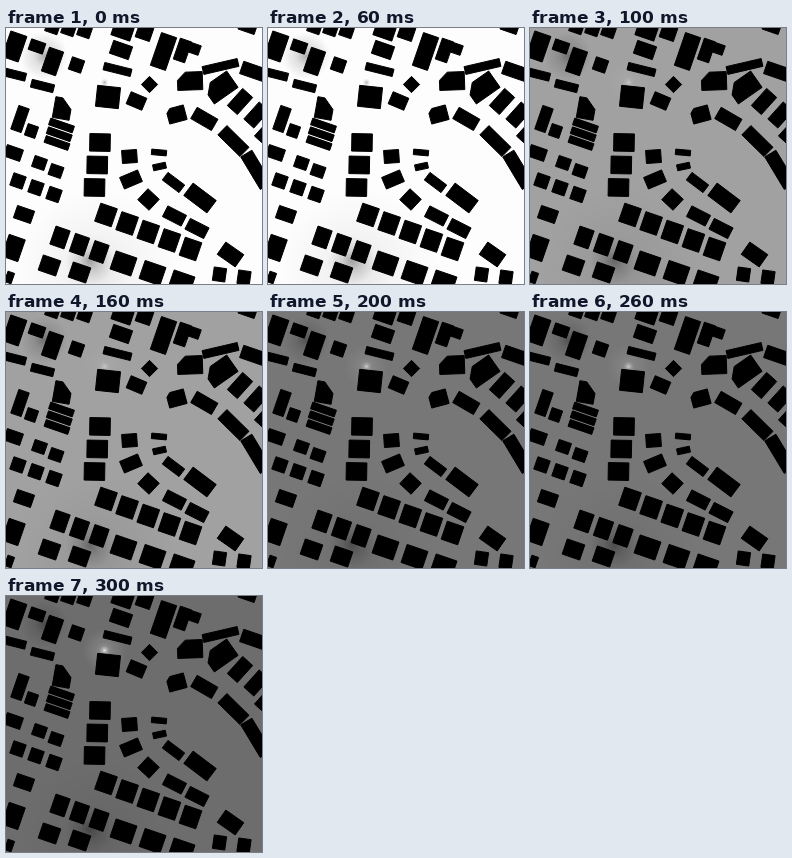
An HTML page with a canvas that plays this animation: 256x256 px, repeating every 0.4 s.

```html
<!DOCTYPE html>
<html lang="en">
<head>
<meta charset="utf-8">
<title>Fading light over a street plan</title>
<style>
  html, body { margin: 0; width: 100%; height: 100%; overflow: hidden; }
  canvas { display: block; width: 256px; height: 256px; }
</style>
</head>
<body>
<canvas id="map" width="256" height="256"></canvas>
<script>
const ctx = document.getElementById('map').getContext('2d');
const STEP = 100, STEPS = 4;
const LAMP = { x: 98.5, y: 54.5 };
const SLOPE = 19; // main street direction in degrees
const plan = new Path2D();

// A rectangle around (x, y); cut chops off its first corner
function house(x, y, w, h, degrees = SLOPE, cut = 0) {
  const l = -w / 2, t = -h / 2;
  const shape = new Path2D(`M${l + cut} ${t}H${-l}V${-t}H${l}V${t + cut}Z`);
  plan.addPath(shape, new DOMMatrix().translate(x, y).rotate(degrees));
}

// Equal houses evenly spaced between two centres
function row(count, x0, y0, x1, y1, w, h, degrees) {
  for (let i = 0; i < count; i++) {
    const p = i / (count - 1);
    house(x0 + (x1 - x0) * p, y0 + (y1 - y0) * p, w, h, degrees);
  }
}

// Houses following a bend, each longer than the last
function crescent(count, cx, cy, radius) {
  for (let i = 0; i < count; i++) {
    const degrees = 30 + 14.5 * i, a = degrees * Math.PI / 180;
    house(cx + radius * Math.sin(a), cy - radius * Math.cos(a), 24 + 7 * i, 13, degrees);
  }
}

function buildNorth() {
  row(3, 46, -1, 78, 3, 13, 11);
  row(2, 8, 46, 36, 57.5, 23, 8, 14);
  house(8, 18, 17, 27);
  house(30.5, 18, 15, 11);
  house(46, 33, 15, 25);
  house(70, 36.5, 13, 13);
  row(2, 116, 3, 114.5, 21.5, 20, 13.5);
  house(111, 41, 28, 7.5, 14);
  house(138, 4, 15, 14);
  house(157, 23, 16, 34.5);
  house(176, 22, 12, 22);
  house(187, 20, 13, 10);
  house(143, 56, 11.5, 11.5, 45);
  house(130, 72.5, 17, 13, 23);
  house(101.5, 68.5, 23, 21, 6);
}

function buildEast() {
  house(241, -1, 17, 9);
  house(214, 38, 36, 8, -13);
  house(247, 43, 25, 13);
  house(183.5, 52.5, 25, 18, -2, 8);
  house(214, 59, 29, 20, -35, 9);
  house(170, 86, 18, 15, -15, 4);
  row(2, 233.5, 73, 250, 86.5, 13.5, 23, 42);
  house(256, 106, 10, 13, 42);
  crescent(3, 125.3, 216, 145);
}

function buildWest() {
  house(56, 80, 21, 17, 100, 10);
  house(13.5, 90.5, 11, 25);
  house(25, 102.5, 11, 12);
  row(3, 55, 97, 50.5, 114.5, 25, 7);
  house(7, 124.5, 17, 12);
  row(2, 33, 134.5, 49.5, 142.5, 13, 11.5);
  row(3, 11.5, 152.5, 47.5, 166, 13, 13);
  house(17.5, 186, 18, 13);
}

function buildCentre() {
  row(3, 93.5, 114, 88, 159, 20.5, 17.5, 1);
  house(123, 128, 15, 13, -4);
  house(124.5, 151, 19.5, 12.5, -23);
  house(152.5, 124, 15, 5.5, 5);
  house(153, 138, 13, 6, -12);
  house(167, 154, 21, 9.5, 37);
  house(193.5, 169.5, 29, 15.5, 37);
  house(142, 171, 15.5, 15, 43);
}

function buildSouth() {
  row(2, 168, 187.5, 190.5, 200, 21, 12, 27);
  row(5, 99.5, 186.5, 184, 220.5, 17.5, 19);
  row(3, 53.5, 209, 92.5, 223.5, 15, 19);
  row(2, 43, 237, 73, 244, 18.5, 16);
  row(3, 117, 235, 175, 254, 22, 19);
  house(7, 219.5, 17, 23);
  house(3, 249, 7, 11);
  house(224, 226, 22, 15, 35);
  row(2, 213, 246, 237.5, 249, 12.5, 13.5, 8);
}

function softSpot(x, y, radius, tone, alpha) {
  const g = ctx.createRadialGradient(x, y, 0, x, y, radius);
  g.addColorStop(0, `rgba(${tone},${tone},${tone},${alpha})`);
  g.addColorStop(0.4, `rgba(${tone},${tone},${tone},${alpha * 0.4})`);
  g.addColorStop(1, `rgba(${tone},${tone},${tone},0)`);
  ctx.fillStyle = g;
  ctx.fillRect(x - radius, y - radius, 2 * radius, 2 * radius);
}

function draw(step) {
  // The ground dims quickly at first, then settles
  const tone = 107 + 146 * Math.exp(-(step ** 1.3));
  ctx.fillStyle = `rgb(${tone},${tone},${tone})`;
  ctx.fillRect(0, 0, 256, 256);

  softSpot(38, 28, 24, 0, 0.3);
  softSpot(84, 233, 24, 0, 0.3);
  softSpot(90, 240, 80, 0, 0.1);

  if (step) {
    softSpot(LAMP.x, LAMP.y, 22, 255, 0.09 * step);
    softSpot(LAMP.x, LAMP.y, 5, 255, 0.15 + 0.2 * step);
  } else {
    softSpot(LAMP.x, LAMP.y, 4, 100, 0.5);
  }

  ctx.save();
  ctx.translate(0.5, 0.5);
  ctx.fillStyle = ctx.strokeStyle = '#000';
  ctx.fill(plan);
  ctx.stroke(plan);
  ctx.restore();
}

function tick() {
  draw(Math.floor(performance.now() / STEP) % STEPS);
  requestAnimationFrame(tick);
}

buildNorth();
buildEast();
buildWest();
buildCentre();
buildSouth();
tick();
</script>
</body>
</html>
```
